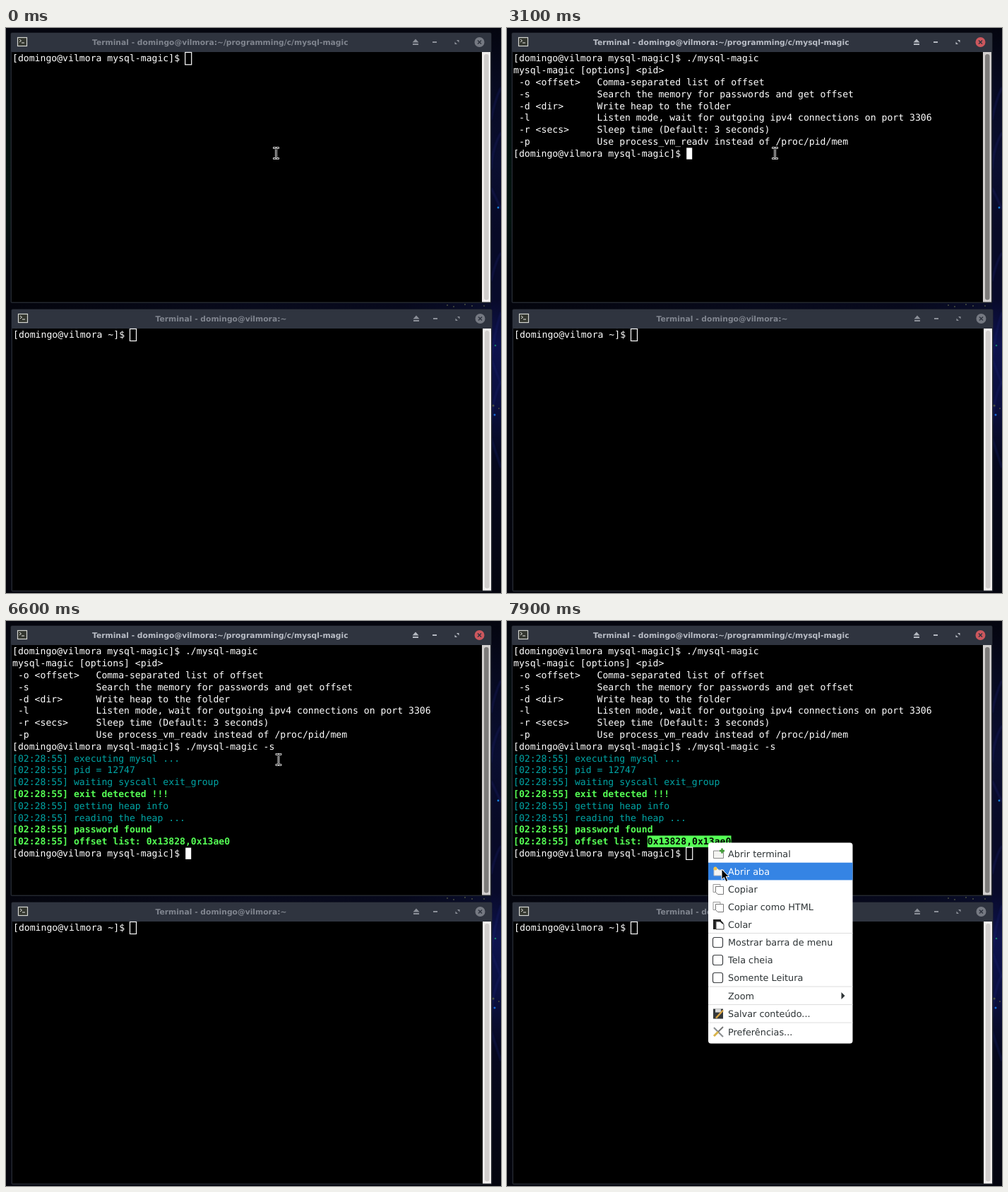
An HTML page for the animation above (8000 ms loop, 701 by 799 pixels).

```html
<!DOCTYPE html>
<html lang="en">
<head>
<meta charset="utf-8">
<title>Terminal session</title>
<style>
  html, body { margin: 0; width: 100%; height: 100%; overflow: hidden; background: #04050f; }
  svg { display: block; width: 701px; height: 799px; }
  text { white-space: pre; text-rendering: geometricPrecision; }
  .mono { font: 13.14px "DejaVu Sans Mono", monospace; fill: #fff; }
  .info { fill: #00a5a5; }
  .good { fill: #55ff55; font-weight: bold; }
  .title { font: bold 10.74px "DejaVu Sans", sans-serif; fill: var(--title); }
  .item { font: 12.85px "DejaVu Sans", sans-serif; fill: #2e3436; }
  .win { --title: #80858f; --icon: #8c9099; --close: #757982; --trough: #f2efee; --slider: #d0cdcc; }
  .win.active { --title: #b9bdc6; --icon: #b4b8c0; --close: #cc575d; --trough: #d3d0cf; --slider: #7d7b7a; }
  .trough { fill: var(--trough); }
  .slider { fill: var(--slider); }
  .icon { fill: var(--icon); }
  .close { fill: var(--close); }
  .cursor { stroke: #fff; stroke-width: 1.2; }
  .hot .item { fill: #fff; }
</style>
</head>
<body>
<svg id="stage" viewBox="0 0 701 799">
  <defs>
    <linearGradient id="rightSide" x2="0" y2="1">
      <stop offset="0" stop-color="#04050f"/>
      <stop offset=".1" stop-color="#070a20"/>
      <stop offset=".24" stop-color="#0a0e30"/>
      <stop offset=".36" stop-color="#080a26"/>
      <stop offset=".48" stop-color="#080a2a"/>
      <stop offset=".56" stop-color="#0e134e"/>
      <stop offset=".67" stop-color="#0b0f3e"/>
      <stop offset=".76" stop-color="#06081e"/>
      <stop offset="1" stop-color="#04050f"/>
    </linearGradient>
    <linearGradient id="leftSide" x2="0" y2="1">
      <stop offset="0" stop-color="#05060f"/>
      <stop offset=".22" stop-color="#03120e"/>
      <stop offset=".34" stop-color="#04130f"/>
      <stop offset=".44" stop-color="#04060e"/>
      <stop offset="1" stop-color="#04050d"/>
    </linearGradient>
    <linearGradient id="gap">
      <stop offset="0" stop-color="#04050d"/>
      <stop offset=".5" stop-color="#080a1c"/>
      <stop offset=".8" stop-color="#07091c"/>
      <stop offset="1" stop-color="#0a0e2c"/>
    </linearGradient>
    <filter id="soft"><feGaussianBlur stdDeviation="1"/></filter>
  </defs>
  <g id="wallpaper">
    <rect width="701" height="799" fill="#05060f"/>
    <rect width="9" height="799" fill="url(#leftSide)"/>
    <rect y="388" width="701" height="11" fill="url(#gap)"/>
    <rect x="687" width="14" height="799" fill="url(#rightSide)"/>
    <g fill="none" stroke="#1b2170" stroke-width="2" opacity=".5" filter="url(#soft)">
      <path d="M701 84q-9 18-14 46M701 148q-12 20-14 52M687 226l14 30M701 318q-8 12-14 40"/>
      <path d="M701 402q-10 30-14 70M688 470l13 34M701 500q-12 22-14 62M687 580l14 42"/>
    </g>
    <g fill="#4b5140">
      <circle cx="625" cy="392" r="1"/><circle cx="634" cy="394" r="1"/><circle cx="650" cy="391" r="1"/>
      <circle cx="660" cy="393" r="1"/><circle cx="677" cy="393" r="1"/><circle cx="690" cy="534" r="1.6"/>
      <circle cx="698" cy="538" r="1"/>
    </g>
    <circle cx="697" cy="254" r="1.4" fill="#1683e0"/>
    <circle cx="693" cy="449" r="1.3" fill="#157c68"/>
    <circle cx="692" cy="547" r="1.5" fill="#1769d8"/>
  </g>
  <g id="windows"></g>
  <g id="screen"></g>
  <g id="menu"></g>
  <g id="beam" fill="none" stroke-linecap="square">
    <path d="M-3-7.5h2l1 1 1-1h2M0-6.5v13M-3 7.5h2l1-1 1 1h2" stroke="#fff" stroke-width="2.7"/>
    <path d="M-3-7.5h2l1 1 1-1h2M0-6.5v13M-3 7.5h2l1-1 1 1h2" stroke="#000"/>
  </g>
  <path id="arrow" d="M0 0v14.5l3.4-3 2.6 6 2.7-1.2-2.6-5.8h4.4z" fill="#000" stroke="#fff"/>
</svg>
<script>
const LOOP = 8000, COL = 7.91, ROW = 16.8;
const HOST = 'domingo@vilmora';
const PROMPT = `[${HOST} mysql-magic]$ `;
const STAMP = '[02:28:55] ';
const OFFSETS = '0x13828,0x13ae0';
const FOCUS = 700, SELECT = 7500, MENU = 7700, HOVER = 7900;
const $ = id => document.getElementById(id);
const esc = s => s.replace(/&/g, '&amp;').replace(/</g, '&lt;');
const label = (x, y, s, cls) => `<text x="${x}" y="${y}" class="${cls}">${esc(s)}</text>`;
const rect = (x, y, w, h, attrs) => `<rect x="${x}" y="${y}" width="${w}" height="${h}" ${attrs}/>`;
const colX = col => 9 + col * COL;
const lineY = row => 47.3 + row * ROW;

function frame(id, x, y, h, title, titleX) {
  return `<g class="win" id="${id}">
    ${rect(x - .5, y - .5, 681, h + 1, 'rx="2" fill="#23272f"')}
    ${rect(x, y, 680, 27, 'rx="2" fill="#2f343f"')}
    ${rect(x + 1, y + 27, 667, h - 28, 'fill="#000"')}
    ${rect(x + 667, y + 27, 12, h - 28, 'class="trough"')}
    ${rect(x + 670, y + 30, 6.5, h - 34, 'rx="3" class="slider"')}
    <g transform="translate(${x} ${y})">
      <rect x="9.5" y="6.5" width="13" height="12" fill="#33362f" stroke="#d3d5d0" stroke-width="1.2"/>
      <path d="M12 9l2.5 2-2.5 2M15 14h4" fill="none" stroke="#e8e8e4"/>
      <path class="icon" d="M573 8.5l4.5 5h-9zM569 15h8v2h-8zM597 12h6v2h-6zM631 10h3.5v3.5zM628.5 12.5v3.5h3.5z"/>
      <circle class="close" cx="663.5" cy="13" r="7"/>
      <path d="M661 10.500l5 5m0-5l-5 5" stroke="#2f343f" stroke-width="1.5"/>
    </g>
    ${label(titleX, y + 17, title, 'title')}
  </g>`;
}

const output = [
  [3100, 1, 'mysql-magic [options] <pid>'],
  [3100, 2, ' -o <offset>   Comma-separated list of offset'],
  [3100, 3, ' -s            Search the memory for passwords and get offset'],
  [3100, 4, ' -d <dir>      Write heap to the folder'],
  [3100, 5, ' -l            Listen mode, wait for outgoing ipv4 connections on port 3306'],
  [3100, 6, ' -r <secs>     Sleep time (Default: 3 seconds)'],
  [3100, 7, ' -p            Use process_vm_readv instead of /proc/pid/mem'],
  [4700, 9, STAMP + 'executing mysql ...', 'info'],
  [4700, 10, STAMP + 'pid = 12747', 'info'],
  [4700, 11, STAMP + 'waiting syscall exit_group', 'info'],
  [5200, 12, STAMP + 'exit detected !!!', 'good'],
  [5200, 13, STAMP + 'getting heap info', 'info'],
  [5200, 14, STAMP + 'reading the heap ...', 'info'],
  [5200, 15, STAMP + 'password found', 'good'],
  [5200, 16, STAMP + 'offset list: ' + OFFSETS, 'good']
];

// [time, row, line being edited]
const edits = [
  [0, 0, PROMPT], [1400, 0, PROMPT + '.'], [1600, 0, PROMPT + './'],
  [2000, 0, PROMPT + './m'], [2100, 0, PROMPT + './my'], [2300, 0, PROMPT + './mysql-magic '],
  [3100, 8, PROMPT], [3600, 8, PROMPT + './mysql-magic '],
  [4300, 8, PROMPT + './mysql-magic -'], [4400, 8, PROMPT + './mysql-magic -s'],
  [4700, 12, ''], [5200, 17, PROMPT]
];

// [time, x, y]
const pointer = [
  [0, 382.5, 177], [100, 379.5, 177], [6400, 389, 172], [6500, 404, 166], [6600, 386, 196],
  [6700, 344, 246], [6800, 302, 292], [6900, 284, 306.5], [7100, 284, 312], [HOVER, 304, 351]
];

$('windows').innerHTML =
  frame('top', 7, 7, 381.5, `Terminal - ${HOST}:~/programming/c/mysql-magic`, 122) +
  frame('bottom', 8, 398, 398.5, `Terminal - ${HOST}:~`, 211.5) +
  label(10, 438.3, `[${HOST} ~]$ `, 'mono') +
  rect(175.5, 425.5, 9, 17, 'class="cursor" fill="none"');

$('screen').innerHTML =
  output.map(([, row, s, cls = '']) => label(9, lineY(row), s, 'mono ' + cls)).join('') +
  [0, 8, 17].map(row => `<text id="edit${row}" class="mono" x="9" y="${lineY(row)}"></text>`).join('') +
  `<g id="selection">${rect(colX(24), 303.5, OFFSETS.length * COL, 16.5, 'fill="#55ff55"')}
    <text x="${colX(24)}" y="${lineY(16)}" class="mono" style="fill:#000;font-weight:bold">${OFFSETS}</text></g>
  <rect id="cursor" class="cursor"/>`;
const outputNodes = [...$('screen').children].slice(0, output.length);

const pages = '<path d="M-7-7h10v11H-7z" fill="#fafafa" stroke="#999"/><path d="M-3.5-4h11V7h-8l-3-3z" fill="#fff" stroke="#777"/>';
const box = '<rect x="-7.5" y="-7" width="14" height="14" rx="2.5" fill="#fff" stroke="#3c3f42" stroke-width="1.2"/>';
const items = [
  [329, 'Abrir terminal', '<path d="M-6.500-4H7.500V6.500H-6.500z" fill="#f4f4f2" stroke="#888"/><path d="M5.500-7.500v7M2-4h7" stroke="#3f9a35" stroke-width="2.5"/>'],
  [354, 'Abrir aba', '<path d="M-6-4h5l2 2h7v8H-6z" fill="#f4f4f2" stroke="#bbb"/><circle cx="-4" cy="-4" r="2.5" fill="#f3c64b"/>'],
  [379.5, 'Copiar', pages],
  [404.5, 'Copiar como HTML', pages],
  [429, 'Colar', '<path d="M-7-7H4V7H-7z" fill="#222"/><path d="M-3-4h7l4 4v7H-3z" fill="#fff" stroke="#444"/><path d="M2-6l5 5" stroke="#222" stroke-width="2"/>'],
  [454.5, 'Mostrar barra de menu', box],
  [479.5, 'Tela cheia', box],
  [504.5, 'Somente Leitura', box],
  [530, 'Zoom', '<path d="M174.500-5l5 5-5 5z" fill="#2e3436"/>'],
  [555.5, 'Salvar conteúdo...', '<path d="M-7-7H7V7H-7z" fill="#34383b"/><path d="M-4-7h8v5h-8z" fill="#d8d8d8"/><path d="M-3 6l10-11" stroke="#d9a545" stroke-width="2.5"/>'],
  [581, 'Preferências...', '<path d="M-6-6L7 7" stroke="#8d9194" stroke-width="2.2"/><path d="M7-7L0 0" stroke="#777" stroke-width="2"/><path d="M0 0l-6 6" stroke="#d9b44a" stroke-width="3"/>']
];
$('menu').innerHTML =
  rect(285, 313.5, 204.5, 284, 'rx="4" fill="#fff"') +
  rect(285, 341.7, 204.5, 24.7, 'id="hover" fill="#3584e4"') +
  [441.5, 517, 542.5, 568].map(y => rect(285, y - .5, 204.5, 1, 'fill="#dedede"')).join('') +
  items.map(([y, s, icon], i) =>
    `<g id="item${i}"><g transform="translate(299 ${y})" fill="none">${icon}</g>${label(313, y + 4.5, s, 'item')}</g>`
  ).join('');

const at = (list, t) => list.findLast(step => step[0] <= t);
const show = (el, on) => { el.style.display = on ? '' : 'none'; };

function render(t) {
  const active = t >= FOCUS, menu = t >= MENU, hover = t >= HOVER;
  $('top').classList.toggle('active', active);
  output.forEach(([from], i) => show(outputNodes[i], t >= from));
  for (const row of [0, 8, 17]) {
    const edit = edits.findLast(e => e[0] <= t && e[1] === row);
    $('edit' + row).textContent = edit ? edit[2] : '';
  }

  const [, row, line] = at(edits, t);
  const solid = active && !menu, pad = solid ? 0 : .5;
  const cursor = { x: colX(line.length) - pad, y: 35 + row * ROW - pad,
    width: 8 + 2 * pad, height: 16.3 + 2 * pad };
  for (const key in cursor) $('cursor').setAttribute(key, cursor[key]);
  $('cursor').style.fill = solid ? '#fff' : 'none';
  $('cursor').style.stroke = solid ? 'none' : '#fff';

  show($('selection'), t >= SELECT);
  show($('menu'), menu);
  show($('hover'), hover);
  $('item1').classList.toggle('hot', hover);

  const [, x, y] = at(pointer, t);
  for (const id of ['beam', 'arrow']) {
    $(id).setAttribute('transform', `translate(${x} ${y})`);
    show($(id), (id === 'arrow') === menu);
  }
}

const start = performance.now();
function tick() {
  render((performance.now() - start) % LOOP);
  requestAnimationFrame(tick);
}
tick();
</script>
</body>
</html>
```
